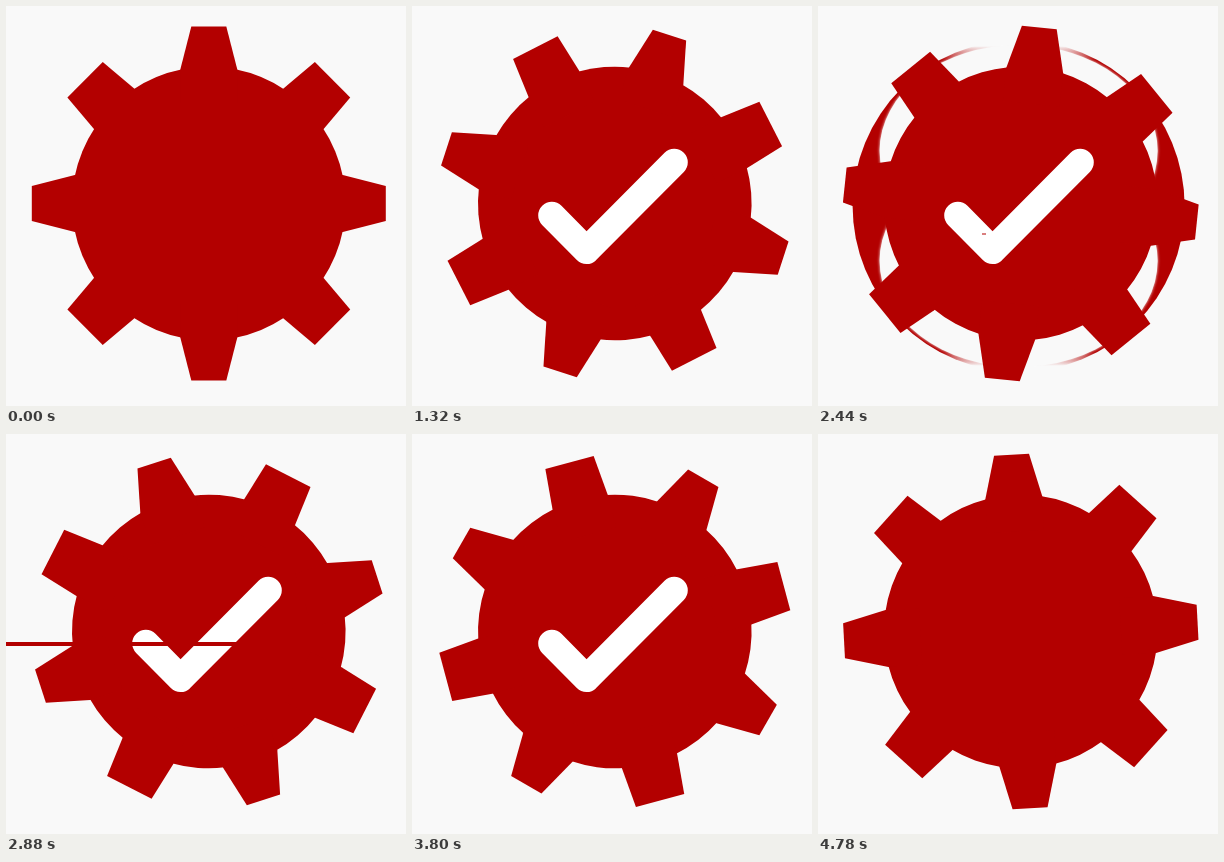
Animation, 400 px wide and 400 px high, one loop 4.8 s. Source, as an HTML page with a canvas:

```html
<!DOCTYPE html>
<html lang="en">
<head>
<meta charset="utf-8">
<title>Gear check</title>
<style>
  html, body { margin: 0; width: 100%; height: 100%; overflow: hidden; background: #f9f9f9; }
  canvas { display: block; width: 400px; height: 400px; }
</style>
</head>
<body>
<canvas id="stage" width="400" height="400"></canvas>
<script>
const LOOP = 4800, RED = '#b30000', BG = '#f9f9f9', TAU = Math.PI * 2;
const ctx = document.getElementById('stage').getContext('2d');

const lerp = (a, b, p) => a + (b - a) * p;
const span = (t, a, b) => Math.min(1, Math.max(0, (t - a) / (b - a)));
const smooth = p => p * p * (3 - 2 * p);

function ellipse(y, rx, ry) {
  ctx.beginPath();
  ctx.ellipse(0, y, rx, ry, 0, 0, TAU);
}

function fillEllipse(color, y, rx, ry) {
  ellipse(y, rx, ry);
  ctx.fillStyle = color;
  ctx.fill();
}

function tooth(angle, tip, tipR, baseR) {
  ctx.save();
  ctx.rotate(angle);
  ctx.beginPath();
  ctx.moveTo(-tip, -tipR);
  ctx.lineTo(tip, -tipR);
  ctx.lineTo(28.5, -baseR);
  ctx.lineTo(28.5, -100);
  ctx.lineTo(-28.5, -100);
  ctx.lineTo(-28.5, -baseR);
  ctx.fill();
  ctx.restore();
}

function gear(t) {
  ctx.save();
  ctx.translate(202.8, 197.5);
  ctx.rotate(t / LOOP * 2 * TAU);
  fillEllipse(RED, 0, 136.8, 136.8);
  for (let i = 0; i < 8; i++) {
    if (i % 2) tooth(i * TAU / 8, 25, 175, 134.5);
    else tooth(i * TAU / 8, 17.5, 177, 134);
  }
  ctx.restore();
}

// Red that fades out towards the top and bottom of the halo.
function fadedRed(fade) {
  const g = ctx.createLinearGradient(0, -170, 0, 170);
  const clear = `rgba(179, 0, 0, ${1 - fade})`;
  g.addColorStop(0.03, clear);
  g.addColorStop(0.07, RED);
  g.addColorStop(0.93, RED);
  g.addColorStop(0.97, clear);
  return g;
}

// Halo behind the gear: thin rings that merge into two side crescents.
function halo(t) {
  if (t < 1350 || t > 2760) return;
  const size = lerp(0.8, 1, smooth(span(t, 1350, 1700))) * lerp(1, 0.8, smooth(span(t, 2520, 2760)));
  const merge = smooth(span(t, 1820, 2440));
  const r = lerp(168, 166, merge);
  ctx.save();
  ctx.translate(lerp(202, 200.6, merge), 200);
  ctx.scale(size, size);
  fillEllipse(fadedRed(merge), 0, r, r);

  ctx.globalAlpha = 1 - merge;
  fillEllipse(BG, 0, 160, 164.5);
  ellipse(0, 160, 159);
  ctx.strokeStyle = RED;
  ctx.lineWidth = 2.5;
  ctx.stroke();
  ctx.shadowColor = RED;
  ctx.shadowBlur = 3;
  for (const y of [-55, 55]) fillEllipse(RED, y, 139, 97);

  ctx.globalAlpha = 1;
  ctx.shadowColor = BG;
  for (const y of [-55, 55]) fillEllipse(BG, y, lerp(131, 139, merge), lerp(94, 106, merge));
  ctx.restore();
}

function check(t) {
  const drawn = smooth(span(t, 120, 640));
  const exit = span(t, 3850, 4300);
  if (!drawn || exit === 1) return;
  ctx.save();
  ctx.translate(-300 * exit * exit, 0);
  ctx.strokeStyle = '#fff';
  ctx.lineWidth = 27.2;
  ctx.lineCap = ctx.lineJoin = 'round';
  ctx.setLineDash([175 * drawn, 400]);
  ctx.beginPath();
  ctx.moveTo(139.8, 209.4);
  ctx.lineTo(174.5, 244.5);
  ctx.lineTo(262.2, 156.4);
  ctx.stroke();
  ctx.restore();
}

// A streak opens to full width, then withdraws to the left.
function streak(t) {
  if (t < 2430 || t > 3200) return;
  const open = smooth(span(t, 2440, 2660));
  const left = lerp(164, 0, open);
  const right = t < 2730 ? lerp(168, 400, open) : lerp(400, 0, span(t, 2730, 3200));
  const y = lerp(228, 210, open), h = lerp(1, 4, open);
  ctx.fillStyle = RED;
  ctx.fillRect(left, y - h / 2, right - left, h);
}

function draw(now) {
  const t = now % LOOP;
  ctx.fillStyle = BG;
  ctx.fillRect(0, 0, 400, 400);
  halo(t);
  gear(t);
  check(t);
  streak(t);
}

let start;
function tick(now) {
  start ??= now;
  draw(now - start);
  requestAnimationFrame(tick);
}
draw(0);
requestAnimationFrame(tick);
</script>
</body>
</html>
```
